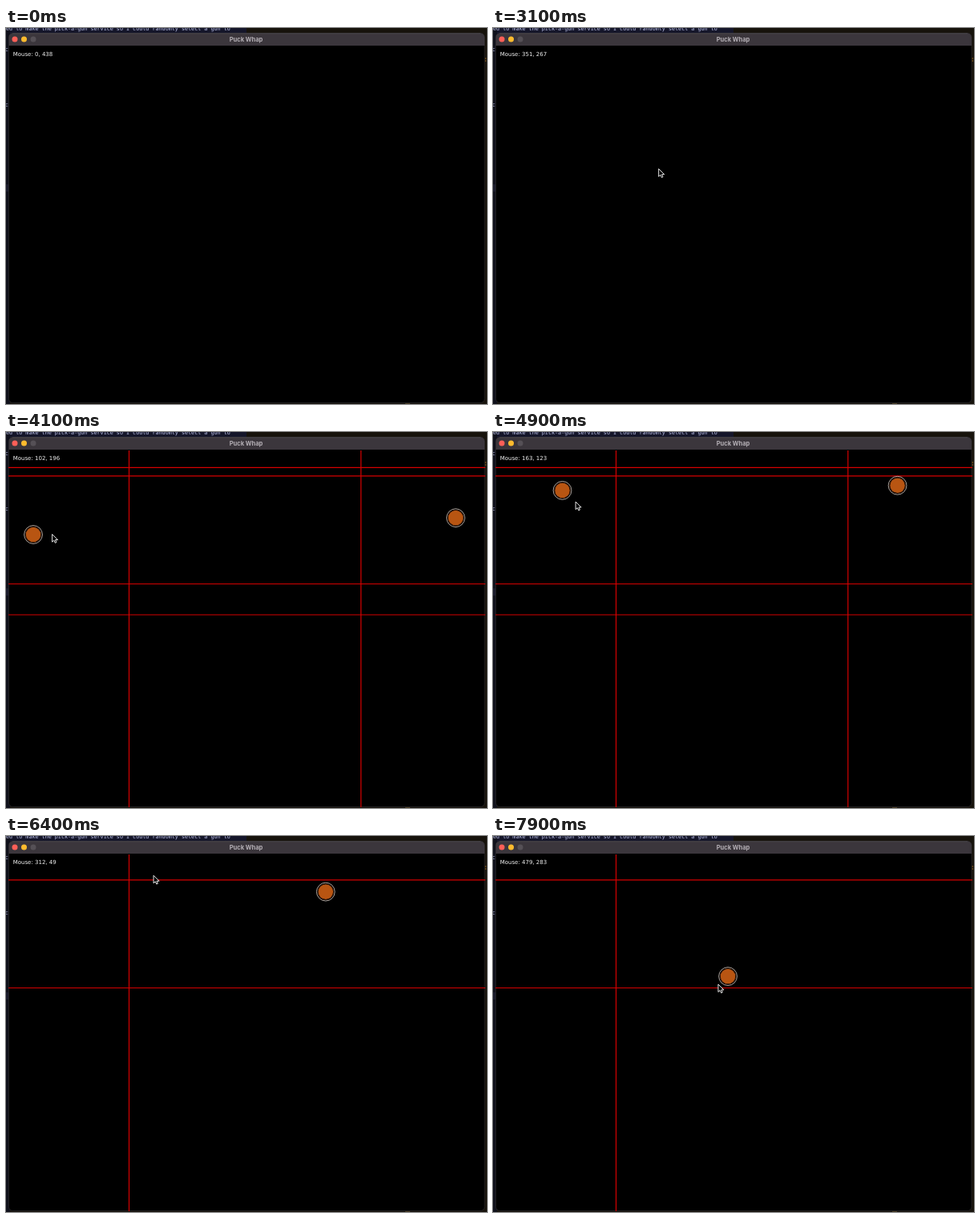
Animation of 600 by 469 pixels, one loop 8 s. Source, as an HTML page:

```html
<!DOCTYPE html>
<html lang="en">
<head>
<meta charset="utf-8">
<title>Puck Whap</title>
<style>
  html, body { margin: 0; width: 100%; height: 100%; overflow: hidden; background: #17130c; }
  svg { display: block; width: 600px; height: 469px; }
  .mono { font: 6.74px "DejaVu Sans Mono", monospace; fill: #b9bfe6; white-space: pre; }
  .title { font: 700 7.5px Inter, sans-serif; fill: #b4afb5; text-anchor: middle; }
  .label { font: 7px "DejaVu Sans", sans-serif; fill: #f2f2f2; }
  .guide { stroke: #d40000; stroke-width: 1.2; fill: none; }
</style>
</head>
<body>
<svg viewBox="0 0 600 469">
  <rect width="300" height="8" fill="#15162a"/>
  <rect width="5" height="469" fill="#10111b"/>
  <rect y="195" width="4" height="9" fill="#1b1c2c"/>
  <text class="mono" x="0" y="3">ed to make the pick-a-gun service so I could randomly select a gun to</text>
  <text class="mono" x="-1.2" y="28.5">c</text>
  <text class="mono" x="-1.2" y="98">c</text>
  <path d="M597.5 38h1.5M597.5 41h1.5" stroke="#b8791c"/>
  <rect x="498" y="468" width="6" height="1" fill="#4a3c22"/>

  <rect x="3.5" y="6.5" width="593.5" height="461" rx="5" stroke="#2c2a2d" stroke-width=".7"/>
  <path d="M3.5 22V11.5a5 5 0 0 1 5-5H592a5 5 0 0 1 5 5V22Z" fill="#3b363c"/>
  <path d="M8 6.8H592" stroke="#5a555b" stroke-width=".6"/>
  <circle cx="11" cy="14" r="3.5" fill="#fe5f57"/>
  <circle cx="22.5" cy="14" r="3.5" fill="#febb2e"/>
  <circle cx="34" cy="14" r="3.5" fill="#555056"/>
  <text class="title" x="299.5" y="16.6">Puck Whap</text>

  <text class="label" id="label" x="8.7" y="34.7"></text>
  <path class="guide" id="guideL" d="M3 44.4H598M3 228H598M442.8 23V468"/>
  <path class="guide" id="guideR" d="M3 54.8H598M3 189.5H598M153.5 23V468"/>
  <defs>
    <g id="clay">
      <circle r="9.3" fill="#b85512"/>
      <circle r="10" fill="none" stroke="#4a2411" stroke-width=".7"/>
      <circle r="11.4" fill="none" stroke="#d2c8c0" stroke-width=".8"/>
    </g>
    <clipPath id="view"><path d="M3.5 22H597V467.5H3.5Z"/></clipPath>
  </defs>
  <g clip-path="url(#view)">
    <use href="#clay" id="clayL"/>
    <use href="#clay" id="clayR"/>
  </g>
  <path id="cursor" d="M0 0V9.6L2.2 7.6L3.7 10.8L5.3 10.1L3.9 7H7Z"
        fill="#000" stroke="#fff" stroke-width=".9" stroke-linejoin="round"/>
</svg>
<script>
const LOOP = 8000, STEP = 100, SCALE = 0.58, LEFT = 3.5, TOP = 22;
const LAUNCH = 3200, HIT = 6300, GRAVITY = 4.56e-5;
const $ = id => document.getElementById(id);
const clamp = k => Math.max(0, Math.min(1, k));

// Places in game units where the pointer arrives and then rests
const stops = [
  { at: 0, rest: 0, x: 0, y: 438 },
  { at: 100, rest: 0, x: 32, y: 705 },
  { at: 300, rest: 100, x: 135, y: 607 },
  { at: 1100, rest: 700, x: 245, y: 347 },
  { at: 3000, rest: 100, x: 351, y: 267 },
  { at: 4000, rest: 0, x: 102, y: 196 },
  { at: 4100, rest: 0, x: 94, y: 184 },
  { at: 5600, rest: 100, x: 241, y: 53 },
  { at: 6300, rest: 100, x: 312, y: 49 },
  { at: 7800, rest: 100, x: 479, y: 283 }
];

function pointer(t) {
  let { x, y } = stops[0];
  for (let i = 1; i < stops.length; i++) {
    const from = stops[i - 1], to = stops[i], leave = from.at + from.rest;
    const k = clamp((t - leave) / (to.at - leave));
    x += (to.x - from.x) * k;
    y += (to.y - from.y) * k;
  }
  return [x, y];
}

const move = (id, x, y) => $(id).setAttribute("transform", `translate(${x} ${y})`);
const show = (id, on) => { $(id).style.display = on ? "" : "none"; };

// Steady sideways speed, free fall around the apex
function clay(side, t, { startX, speed, apexTime, apexY, end }) {
  const on = t >= LAUNCH && t < end;
  show("clay" + side, on);
  show("guide" + side, on);
  move("clay" + side, startX + speed * (t - LAUNCH), apexY + GRAVITY / 2 * (t - apexTime) ** 2);
}

function draw(t) {
  clay("L", t, { startX: -25, speed: 0.0656, apexTime: 6010, apexY: 44.8, end: HIT });
  clay("R", t, { startX: 624.4, speed: -0.0705, apexTime: 5608, apexY: 55.3, end: LOOP });
  const [x, y] = pointer(t);
  show("cursor", t > 0);
  move("cursor", LEFT + x * SCALE - 0.4, TOP + y * SCALE - 1.2);
  // The readout trails the pointer by one step
  $("label").textContent = "Mouse: " + pointer(t - STEP).map(Math.round).join(", ");
}

function tick() {
  draw(Math.floor(performance.now() % LOOP / STEP) * STEP);
  requestAnimationFrame(tick);
}
tick();
</script>
</body>
</html>
```
